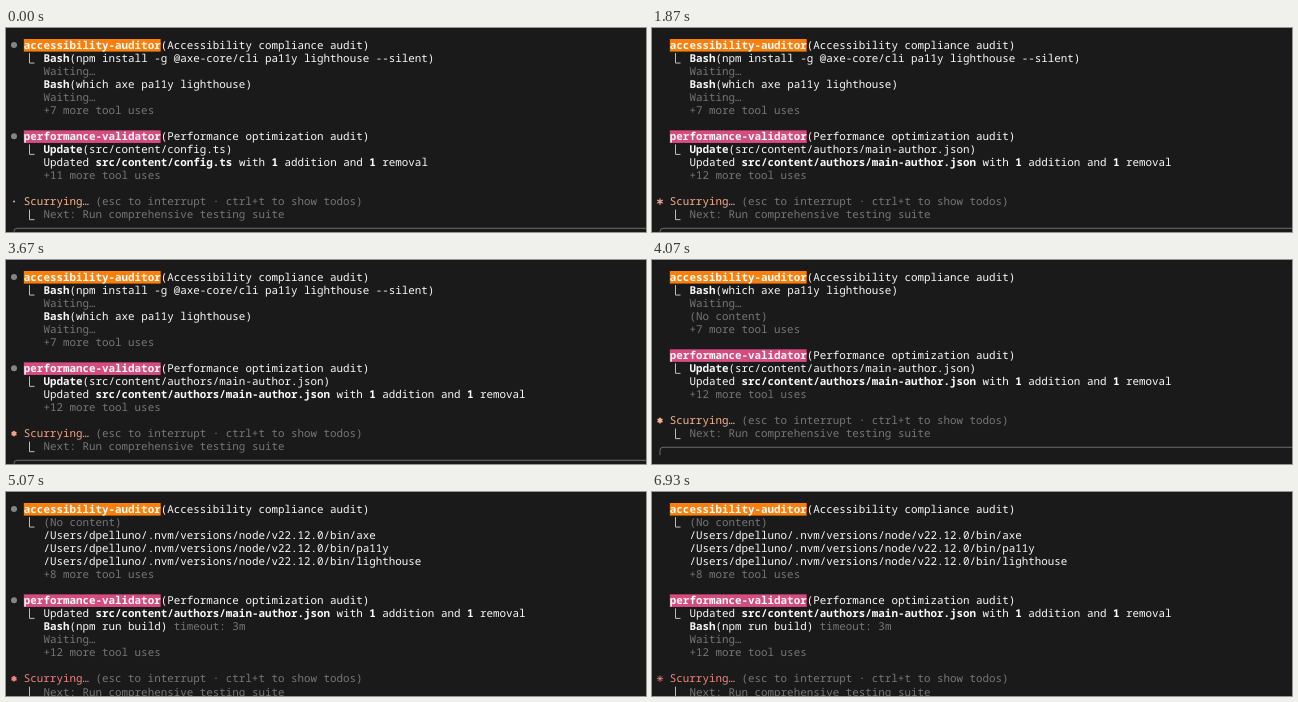
These frames come from a looping animation (640x204 px, 7 s). An HTML page:

```html
<!DOCTYPE html>
<html lang="en">
<head>
<meta charset="utf-8">
<style>
html, body { margin: 0; height: 100%; overflow: hidden; background: #1a1a1a; }
svg { display: block; width: 640px; height: 204px; }
text {
  font: 10.86px "Noto Sans Mono", "DejaVu Sans Mono", monospace;
  fill: #fafafa;
  white-space: pre;
  text-rendering: geometricPrecision;
}
.b { font-weight: 700; }
.d { fill: #767676; }
.line { fill: none; stroke: #bcbcbc; }
#spin { stroke-linecap: round; }
</style>
</head>
<body>
<svg viewBox="0 0 640 204">
  <g id="page"></g>
  <g id="status">
    <path id="spin"/>
    <text id="verb" x="17.8">Scurrying…</text>
  </g>
</svg>
<script>
const LOOP = 7000, ROW = 13.05, CELL = 6.515, LEFT = 4.8;
const $ = id => document.getElementById(id);
const col = n => LEFT + n * CELL;
const mid = row => 17 + row * ROW;

// *bold* and ~dim~ spans
const markup = s => s
  .replace(/\*(.+?)\*/g, '<tspan class="b">$1</tspan>')
  .replace(/~(.+?)~/g, '<tspan class="d">$1</tspan>');
const text = (c, row, s) =>
  `<text x="${col(c)}" y="${mid(row) + 3.8}">${markup(s)}</text>`;
const elbow = row =>
  `<path class="line" d="M23.5 ${mid(row) - 5}v10h5"/>`;

function block(row, color, name, title, lines) {
  return `<circle class="bullet" cx="8" cy="${mid(row)}" r="3" fill="#858585"/>` +
    `<rect x="${col(2)}" y="${mid(row) - 6}" width="${name.length * CELL}" height="12.6" fill="${color}"/>` +
    text(2, row, `*${name}*(${title})`) + elbow(row + 1) +
    lines.map((s, i) => text(5, row + 1 + i, s)).join('');
}

const wait = '~Waiting…~';
const more = n => `~+${n} more tool uses~`;
const which = '*Bash*(which axe pa11y lighthouse)';
const update = file => `*Update*(src/content/${file})`;
const updated = file => `Updated *src/content/${file}* with *1* addition and *1* removal`;
const config = 'config.ts', author = 'authors/main-author.json';
const bin = name => `/Users/dpelluno/.nvm/versions/node/v22.12.0/bin/${name}`;

const install = ['*Bash*(npm install -g @axe-core/cli pa11y lighthouse --silent)', wait, which, wait, more(7)];
const edited = [update(author), updated(author), more(12)];
const scenes = [
  { at: 0, audit: install, perf: [update(config), updated(config), more(11)] },
  { at: 1400, audit: install, perf: [updated(config), update(author), more(11)] },
  { at: 1600, audit: install, perf: edited },
  { at: 4000, audit: [which, wait, '~(No content)~', more(7)], perf: edited, stalled: true },
  { at: 4200,
    audit: ['~(No content)~', bin('axe'), bin('pa11y'), bin('lighthouse'), more(8)],
    perf: [updated(author), '*Bash*(npm run build) ~timeout: 3m~', wait, more(12)] }
];

let shown;
function build(scene) {
  const second = scene.audit.length + 2;
  const status = second + scene.perf.length + 2;
  const edge = mid(status + 2) + 0.6;
  $('page').innerHTML =
    block(0, '#fb7f08', 'accessibility-auditor', 'Accessibility compliance audit', scene.audit) +
    block(second, '#d54c7f', 'performance-validator', 'Performance optimization audit', scene.perf) +
    text(13, status, '~(esc to interrupt · ctrl+t to show todos)~') +
    elbow(status + 1) +
    text(5, status + 1, '~Next: Run comprehensive testing suite~') +
    `<path class="line" style="stroke:#6c6c6c" d="M8 ${edge + 8}v-5q0 -3 3 -3H640"/>`;
  $('verb').setAttribute('y', mid(status) + 3.8);
  $('spin').setAttribute('transform', `translate(8 ${mid(status)})`);
  shown = scene;
}

// spinner shapes: arms, radius, line width
const stars = [[1, 0, 2], [4, 2.7, 1.3], [8, 2.8, 0.8], [6, 2.8, 1.1], [6, 2.8, 1.4], [6, 2, 1.9]];

function star([arms, radius, width], color) {
  let d = '';
  for (let i = 0; i < arms; i++) {
    const a = i / arms * 2 * Math.PI - Math.PI / 2;
    d += `M0 0L${radius * Math.cos(a)} ${radius * Math.sin(a)}`;
  }
  $('spin').setAttribute('d', d);
  $('spin').setAttribute('stroke', color);
  $('spin').setAttribute('stroke-width', width);
}

function draw(t) {
  const scene = scenes.findLast(s => t >= s.at);
  if (scene !== shown) build(scene);

  const lit = (t + 235) % 1200 < 600;
  for (const b of document.querySelectorAll('.bullet')) b.style.opacity = lit ? 1 : 0;

  const glow = (1 + Math.cos(Math.PI * (t - 100) / 1000)) / 2;
  const mix = (a, b) => Math.round(a + (b - a) * glow);
  const color = `rgb(${mix(240, 246)},${mix(132, 180)},${mix(124, 142)})`;
  $('verb').style.fill = color;

  // the star grows, then shrinks back
  const step = scene.stalled ? 6 : Math.floor(t / 120 + 11.8) % 12;
  star(stars[Math.min(step, 11 - step)], color);
}

const start = performance.now();
function tick() {
  draw((performance.now() - start) % LOOP);
  requestAnimationFrame(tick);
}
tick();
</script>
</body>
</html>
```
